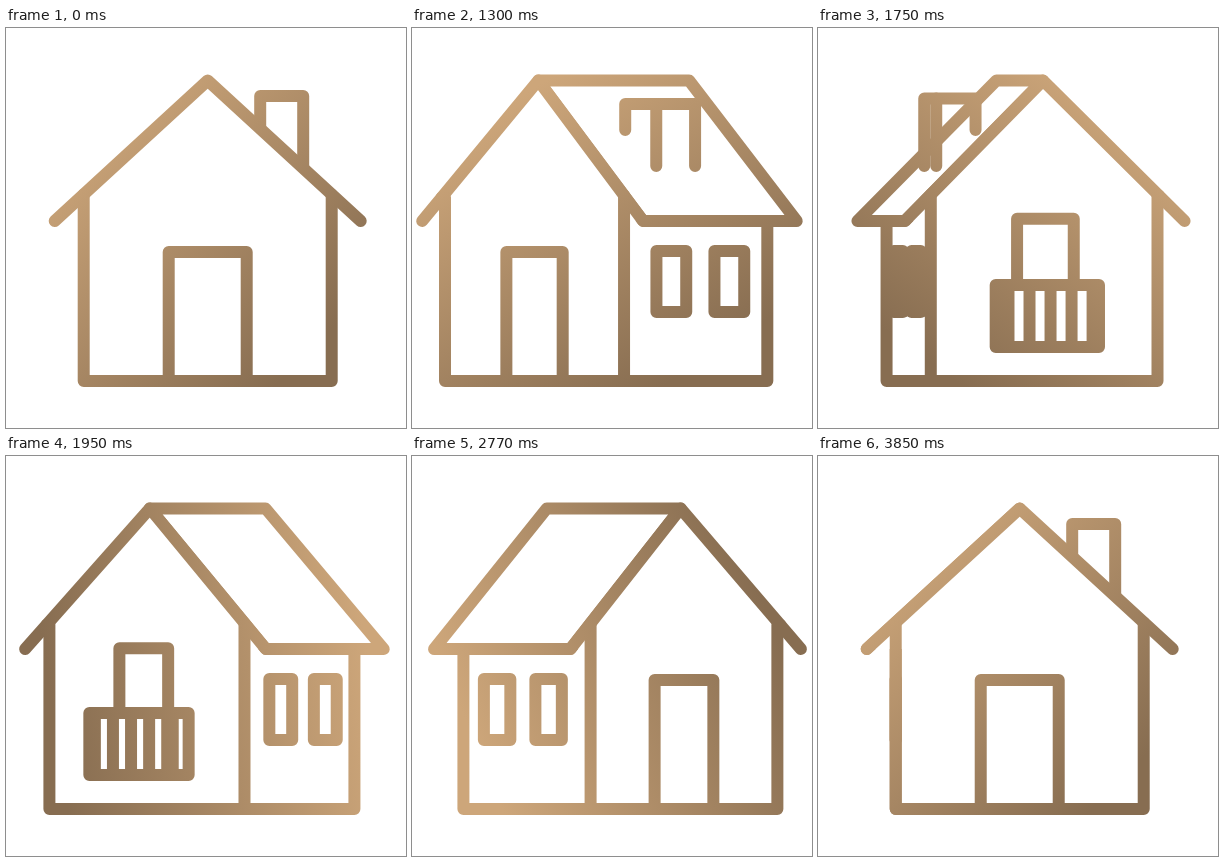
An HTML page with a canvas for the animation above (3870 ms loop, 400 by 400 pixels).

```html
<!DOCTYPE html>
<html lang="en">
<head>
<meta charset="utf-8">
<title>Turning house</title>
<style>
  html, body { margin: 0; width: 100%; height: 100%; overflow: hidden; background: #fff; }
  canvas { display: block; width: 400px; height: 400px; }
</style>
</head>
<body>
<canvas id="stage" width="400" height="400"></canvas>
<script>
const ctx = document.getElementById('stage').getContext('2d');
const LOOP = 3870, HOLD = 1000;
const CX = 201.7, RIDGE = 52.5, EAVE = 193, GROUND = 353;
const HALF_EAVE = 153, HALF_WALL = 124;

const clamp = (v, lo, hi) => Math.min(hi, Math.max(lo, v));

function bezier(x1, y1, x2, y2) {
  const at = (a, b, s) => 3 * a * s * (1 - s) ** 2 + 3 * b * s * s * (1 - s) + s ** 3;
  return u => {
    let lo = 0, hi = 1;
    for (let i = 0; i < 30; i++) {
      const mid = (lo + hi) / 2;
      if (at(x1, x2, mid) < u) lo = mid; else hi = mid;
    }
    return at(y1, y2, (lo + hi) / 2);
  };
}
const turnEase = bezier(0.189, 0.03, 0.241, 1);
const lightEase = bezier(0.34, 0, 0.42, 1);

function line(points, filled) {
  ctx.beginPath();
  points.forEach(([x, y]) => ctx.lineTo(x, y));
  if (filled) {
    ctx.closePath();
    ctx.fill();
  }
  ctx.stroke();
}

const box = (x0, y0, x1, y1) => line([[x0, y0], [x1, y0], [x1, y1], [x0, y1]], true);

function setLight(angle) {
  const dx = 160 * Math.cos(angle), dy = 160 * Math.sin(angle);
  const paint = ctx.createLinearGradient(200 + dx, 200 + dy, 200 - dx, 200 - dy);
  paint.addColorStop(0, '#cda67a');
  paint.addColorStop(1, '#876d51');
  ctx.strokeStyle = paint;
}

// turn runs 0..8: front, corner, side, corner, back and round again
function drawHouse(turn) {
  const quarter = turn % 4;
  const m = quarter < 2 ? quarter : 4 - quarter;
  const pose = (front, corner, side) =>
    m < 1 ? front + (corner - front) * m : corner + (side - corner) * (m - 1);

  const side = quarter < 2 ? -1 : 1;            // where the visible gable stands
  const frontSeen = turn < 2 || turn >= 6;
  const chimneySide = turn < 4;
  const c = pose(1, 0.705, 0);
  const ridge = pose(0, 80, 124);
  const eave = pose(0, 86, 173);
  const wall = pose(0, 84, 147);

  const apex = CX + side * ridge;
  const farApex = CX - side * ridge;
  const innerEave = CX + side * (eave - HALF_EAVE * c);
  const outerEave = CX + side * (eave + HALF_EAVE * c);
  const farEave = CX - side * (pose(0, 77, 175) + HALF_EAVE * c);
  const gableMid = CX + side * wall;
  const inner = gableMid - side * HALF_WALL * c;
  const outer = gableMid + side * HALF_WALL * c;
  const farWall = CX - side * (pose(0, 68, 147) + HALF_WALL * c);

  function chimney() {
    const cos = frontSeen ? c : -c;
    const depth = chimneySide ? ridge : 0;
    const top = 68 + 8.5 * m;
    const front = -0.35 * depth, back = 0.165 * depth;
    const near = frontSeen ? front : back, far = frontSeen ? back : front;
    const edge = CX + 95.5 * cos;
    const narrow = CX + 52.5 * cos + near;
    line([[narrow, 102], [narrow, top], [edge + near, top], [edge + near, 138]]);
    if (depth > 0) line([[edge + near, top], [edge + far, top], [edge + far, 138]]);
  }

  function sideWall() {
    line([[farWall, EAVE], [farWall, GROUND], [inner, GROUND]]);
    const mid = (farWall + inner) / 2;
    const length = Math.abs(inner - farWall);
    const half = 0.104 * length;
    const slant = Math.min(1, c / 0.7);
    [mid + side * (0.25 - 0.08 * slant) * length, mid - side * (0.25 - 0.015 * slant) * length]
      .forEach(x => box(x - half, 223, x + half, 284));
  }

  function roof() {
    line([[apex, RIDGE], [farApex, RIDGE], [farEave, EAVE], [innerEave, EAVE], [apex, RIDGE]], true);
  }

  function gable() {
    ctx.beginPath();
    ctx.moveTo(innerEave, EAVE);
    ctx.lineTo(apex, RIDGE);
    ctx.lineTo(outerEave, EAVE);
    ctx.fill();
    ctx.stroke();

    const run = (apex - innerEave) * side;
    const innerTop = run > 0
      ? clamp(RIDGE + (EAVE - RIDGE) * (apex - inner) * side / run, 166, EAVE)
      : EAVE;
    const outerTop = 166.5 + 0.52 * (eave - ridge);
    const joint = apex + (outerEave - apex) * (outerTop - RIDGE) / (EAVE - RIDGE);
    line([[inner, innerTop], [inner, GROUND], [outer, GROUND], [outer, outerTop], [joint, outerTop]]);
  }

  function door() {
    const half = 39 * c;
    line([[gableMid - half, GROUND], [gableMid - half, 224],
          [gableMid + half, 224], [gableMid + half, GROUND]]);
  }

  function balcony() {
    const out = side * pose(0, 22, 20);
    const doorMid = gableMid + 0.2 * out;
    const doorTop = 190 + 10 * (1 - c);
    const doorHalf = 31 * c, half = 53 * c;
    line([[doorMid - doorHalf, 288], [doorMid - doorHalf, doorTop],
          [doorMid + doorHalf, doorTop], [doorMid + doorHalf, 288]]);
    const mid = gableMid + out;
    box(gableMid - side * half, 257, mid + side * half, 319);
    [-46, -23, 0, 23, 46, -53 * side].forEach(p =>
      line([[mid + p * c, 257], [mid + p * c, 319]]));
  }

  if (!chimneySide || m === 0) chimney();
  if (m > 0) {
    sideWall();
    roof();
    if (chimneySide) chimney();
  }
  gable();
  if (frontSeen) door(); else balcony();
}

function draw(now) {
  const u = clamp((now % LOOP - HOLD) / (LOOP - HOLD), 0, 1);
  ctx.fillStyle = '#fff';
  ctx.fillRect(0, 0, 400, 400);
  ctx.lineWidth = 12;
  ctx.lineJoin = ctx.lineCap = 'round';
  setLight((225 + 360 * lightEase(u)) * Math.PI / 180);
  drawHouse(u > 0 ? 8 * turnEase(u) % 8 : 0);
}

const start = performance.now();
function tick() {
  draw(performance.now() - start);
  requestAnimationFrame(tick);
}
tick();
</script>
</body>
</html>
```
